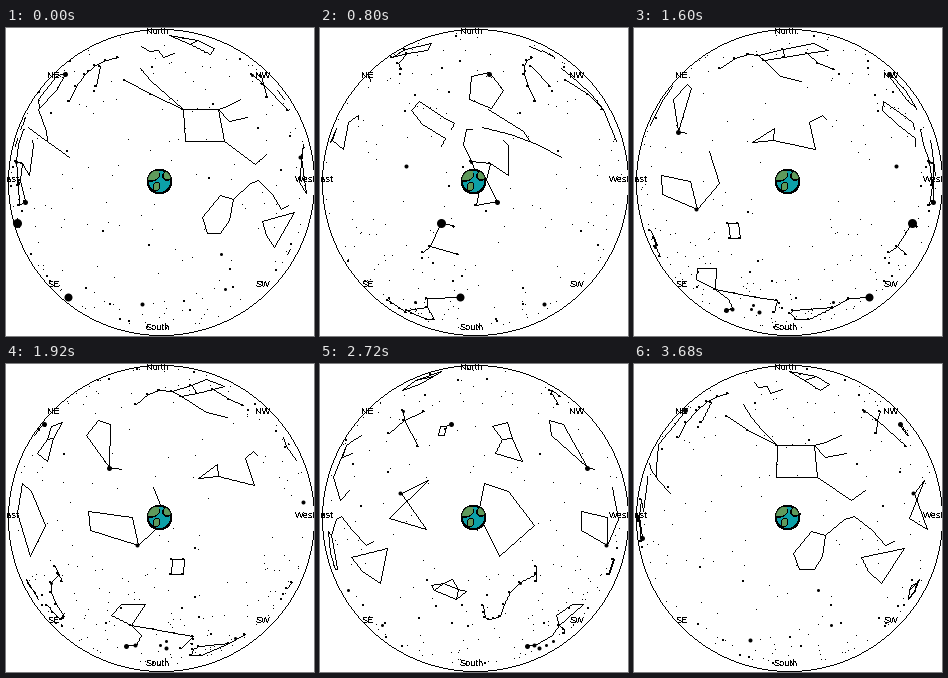
Recreate the animation shown at these times as a matplotlib script. Size 308 px wide and 308 px high, loop 3.84 s.

```python
import numpy as np
import matplotlib.pyplot as plt
from matplotlib.animation import FuncAnimation
from matplotlib.patches import Circle, Ellipse

plt.rcParams.update({
    "text.antialiased": False,
    "font.family": "Liberation Sans",
})

SIZE, DPI = 308, 77
PX = 72 / DPI
FRAMES, INTERVAL = 24, 160
CX, CY, RADIUS = 152, 151.7, 148.3
START = 13.1          # sidereal angle overhead at the start, in degrees

# A star is a complex number: right ascension + declination * 1j, in degrees.
segments = []
dots = {size: [] for size in (1, 2, 3, 4, 5, 8, 9)}


def trace(*stars, dot=1):
    """Join stars with lines and mark each of them."""
    segments.extend(zip(stars, stars[1:]))
    dots[dot].extend(stars)


def loop(*stars, dot=1):
    trace(*stars, stars[0], dot=dot)


def bow(start, end, bend, count):
    """Stars on an arch from start to end; bend is its relative height."""
    t = np.linspace(0, 1, count)
    return start + (end - start) * (t + 1j * bend * np.sin(np.pi * t))


def ring(center, rx, ry, count, turn):
    angle = np.radians(turn) + 2 * np.pi * np.arange(count) / count
    return center + rx * np.cos(angle) + 1j * ry * np.sin(angle)


def box(center, w, h):
    w, h = w / 2, 1j * h / 2
    return center - w + h, center + w + h, center + w - h, center - w - h


def glow(size, *stars):
    dots[size].extend(stars)


def horse_and_lady():
    scheat, alpheratz, algenib, markab = box(354.4 + 21.8j, 16.6, 13.6)
    loop(scheat, alpheratz, algenib, markab)
    trace(scheat, 341 + 30j, 332.5 + 33j)
    trace(scheat, 342 + 23.5j, 332 + 25j)
    trace(markab, 332.5 + 6j, 326 + 10j)
    trace(*bow(alpheratz, 391 + 42j, 0, 3), dot=2)
    trace(*bow(alpheratz, 384.5 + 48.6j, 0, 4))


def around_the_pole():
    trace(29 + 64j, 21 + 60j, 14 + 61j, 10 + 56j, 2 + 59j)
    beta, iota = 322 + 70.6j, 342 + 66j
    loop(320 + 62.6j, beta, iota, 333 + 58j)
    trace(beta, 355 + 77.6j, iota)


def bear():
    megrez, dubhe = 184 + 57j, 166 + 62j
    merak, phecda = 165.5 + 56j, 178.5 + 54j
    trace(*bow(207 + 49j, megrez, -0.165, 4), dot=2)
    loop(megrez, dubhe, merak, phecda, dot=2)
    trace(phecda, 167 + 44.5j, 155.6 + 41.5j)
    trace(dubhe, 136 + 67.6j, 128 + 61j, 148 + 59j, merak)
    trace(148 + 59j, 143 + 52j, 135 + 48j, dot=2)


def northern_sky():
    trace(*bow(43 + 56j, 58.5 + 32j, 0.28, 6), dot=2)
    trace(51 + 50j, 46.5 + 39j, dot=2)

    deneb, sadr = 310.5 + 45.3j, 305.6 + 40.3j
    trace(deneb, sadr, 292.7 + 28j, dot=2)
    trace(296 + 45j, sadr, 311.5 + 34j, dot=2)
    vega, lyre = 279.2 + 38.8j, box(283 + 35j, 3, 4.4)
    loop(*lyre)
    trace(vega, lyre[0])

    arcturus = 214 + 19j
    loop(arcturus, 229 + 33j, 225.5 + 40.4j, 218 + 38j)
    trace(arcturus, 208.7 + 18.4j)
    left, right = 255 + 31j, 250 + 31.6j
    loop(left, 259 + 37j, 250.7 + 39j, right)
    loop(left, right, 247.5 + 21.5j, 258.7 + 25j)
    loop(*ring(82.5 + 38j, 9, 9.5, 5, 112))

    glow(5, vega, arcturus, 79.2 + 46j)
    glow(3, deneb)


def zodiac():
    trace(*bow(51 + 9j, 84.4 + 21j, 0.03, 4))
    trace(65 + 15.5j, 67 + 19j, 81.6 + 28.6j)

    trace(113.6 + 32j, 101 + 25j, 96 + 22.5j, 97 + 20j)
    trace(113.6 + 32j, 116.3 + 28j, 110 + 22j, 99.4 + 16.4j, 101 + 13j)

    tail, hip = 177.3 + 14.6j, 168.6 + 15.4j
    loop(tail, 168.5 + 20.5j, hip)
    trace(hip, 152 + 12j, 154 + 23j, 148 + 26j, 146.5 + 24j)

    spica = 201.3 - 11.2j
    trace(spica, 190.4 - 1.4j, 195.5 + 11j)
    loop(spica, 221 - 5.7j, 221.6 + 2j, 203.7 - 0.6j)
    glow(4, spica)

    antares, bend = 247.3 - 26.4j, 253.6 - 42.4j
    trace(*bow(241.4 - 19.8j, 239.7 - 26j, 0, 3), dot=2)
    trace(240.5 - 23j, antares, dot=2)
    trace(*bow(antares, bend, 0.12, 4), dot=2)
    trace(*bow(bend, 263.4 - 37j, -0.4, 6), dot=2)
    glow(3, antares)

    lid, top = 277 - 25.4j, 281.4 - 27j
    handle, base, spout = 285.6 - 30j, 276 - 34.4j, 275 - 29.8j
    loop(lid, top, 286.7 - 27.7j, handle, base, spout)
    trace(handle, top, spout, 271.4 - 30.4j, base)

    loop(304.5 - 12.5j, 327 - 16j, 322 - 22j, 313 - 27j)
    jar = 343 - 7.6j
    trace(311 - 9.7j, 315.7 - 11.4j, 323 - 5.6j, 331.4 - 0.3j, 335.4 - 1.4j,
          jar)
    loop(jar, 348.6 - 6j, 355.7 - 14.5j, 353 - 21j, 347 - 21j, 343.7 - 15.8j)


def equator():
    betelgeuse, bellatrix = 88.8 + 7.4j, 81.3 + 6.3j
    rigel = 78.6 - 8.2j
    loop(betelgeuse, bellatrix, *bow(83 - 0.3j, 85.2 - 2j, 0, 3), dot=2)
    loop(83 - 0.3j, rigel, 87 - 9.7j, 85.2 - 2j, dot=2)
    trace(betelgeuse, 92 + 14j, 91 + 20j, 88.6 + 20j)
    trace(bellatrix, 74.6 + 1.7j, 74 + 13.5j, 76 + 15.4j)

    altair = 297.7 + 9j
    loop(altair, 286.4 + 14j, 302.8 - 0.8j, 286.6 - 5j)
    loop(263.7 + 12.6j, 254.4 + 9.4j, 243.6 - 3.7j, 257.6 - 15.7j, 266 + 1j)
    loop(*box(185.5 - 20j, 4.8, 6), dot=2)

    glow(5, rigel)
    glow(4, altair, 114.8 + 5.2j)
    glow(3, betelgeuse)


def south():
    sirius, flank = 101.3 - 16.7j, 107 - 26.4j
    trace(95.7 - 18j, sirius, flank, 111 - 29.3j, dot=2)
    trace(flank, 95 - 30j, dot=2)

    canopus, keel = 96 - 52.5j, 125.6 - 59.5j
    trace(canopus, 119 - 53j, keel, dot=2)
    loop(keel, 158 - 61.7j, 160.7 - 64.4j, 153.4 - 70j, 138 - 69.7j, dot=2)

    chest, back = 209 - 47.3j, 205 - 53.5j
    rigil, hadar = 220 - 60.8j, 211 - 60.4j
    trace(rigil, hadar, back, chest)
    loop(chest, 219 - 42j, 211.7 - 36.4j, 200 - 36.7j)
    trace(*bow(chest, 170 - 54.5j, 0, 4), 174 - 63j, dot=2)

    glow(9, sirius)
    glow(8, canopus)
    glow(5, rigil)
    glow(4, hadar, 24.4 - 57.2j, 186.6 - 63j)
    glow(3, 344.4 - 29.6j, 192 - 59.7j, 188 - 57j, 332 - 47j, 131 - 54.7j)


def faint_stars(count=360, band=60):
    rng = np.random.default_rng(12)
    lift = 2 * rng.random(count) ** 1.2 - 1
    sky = rng.uniform(0, 360, count) + 1j * np.degrees(np.arcsin(lift))
    milky = rng.uniform(95, 275, band) + 1j * rng.uniform(-68, -18, band)
    for star in np.r_[sky, milky]:
        glow(2 if rng.random() < 0.12 else 1, star)


for build in (horse_and_lady, around_the_pole, bear, northern_sky, zodiac,
              equator, south, faint_stars):
    build()
segments = np.array(segments)


def project(stars, overhead):
    """Orthographic view of the sky dome, east on the left."""
    stars = np.asarray(stars)
    hour, dec = np.radians(overhead - stars.real), np.radians(stars.imag)
    x = np.round(CX + RADIUS * np.cos(dec) * np.sin(hour))
    y = np.round(CY - RADIUS * np.sin(dec))
    return x, y, np.cos(hour) > 0


def pixel_lines(overhead):
    """Pixels of all lines whose two ends are above the horizon."""
    x, y, up = project(segments, overhead)
    parts = []
    for (x0, x1), (y0, y1) in zip(x[up.all(axis=1)], y[up.all(axis=1)]):
        count = int(max(abs(x1 - x0), abs(y1 - y0))) + 1
        parts.append([np.linspace(x0, x1, count), np.linspace(y0, y1, count)])
    return np.round(np.hstack(parts)) + 0.5


fig = plt.figure(figsize=(SIZE / DPI, SIZE / DPI), dpi=DPI, facecolor="white")
ax = fig.add_axes([0, 0, 1, 1])
ax.set(xlim=(0, SIZE), ylim=(SIZE, 0))
ax.axis("off")


def marks(marker, size=1):
    return ax.plot([], [], marker, color="black", ms=size * PX, mew=0,
                   antialiased=False)[0]


# Horizon: one pixel per step along each quarter
step = np.arange(-108, 109)
drop = np.round(np.sqrt(153 ** 2 - step ** 2))
marks(",").set_data(154.5 + np.r_[step, step, drop, -drop],
                    154.5 + np.r_[drop, -drop, step, step])

lines = marks(",")
layers = {size: marks("," if size == 1 else "s" if size == 2 else "o", size)
          for size in dots}

for i, name in enumerate(["North", "NE", "East", "SE",
                          "South", "SW", "West", "NW"]):
    angle = np.radians(45 * i)
    ax.text(CX - 148 * np.sin(angle), 154.3 - 148 * np.cos(angle), name,
            size=9.3 * PX, ha="center", va="baseline", zorder=4)


def globe(x, y, r):
    def patch(dx, dy, w, h, tilt, color):
        land = Ellipse((x + dx, y + dy), w, h, angle=tilt, color=color, lw=0,
                       antialiased=False, zorder=6)
        ax.add_patch(land)
        land.set_clip_path(sea)

    sea = Circle((x, y), r, fc="#0ca0a8", ec="black", lw=PX,
                 antialiased=False, zorder=5)
    ax.add_patch(sea)
    patch(-6, -5, 13, 8, -30, "black")
    patch(-6, -6, 12, 7, -30, "#5f9a5c")
    patch(7, -5, 8, 7, 40, "black")
    patch(8, -6, 7, 6, 40, "#5f9a5c")
    patch(-3, 5, 6, 9, 15, "black")
    patch(-3, 5, 4, 7, 15, "#5f9a5c")


globe(153.5, 153.5, 11.8)


def update(frame):
    overhead = START + 360 * frame / FRAMES
    lines.set_data(*pixel_lines(overhead))
    for size, layer in layers.items():
        x, y, up = project(dots[size], overhead)
        shift = 0.5 * (size % 2)
        layer.set_data(x[up] + shift, y[up] + shift)
    return [lines, *layers.values()]


anim = FuncAnimation(fig, update, frames=FRAMES, interval=INTERVAL,
                     repeat=True, repeat_delay=0, blit=False)
plt.show()
```
